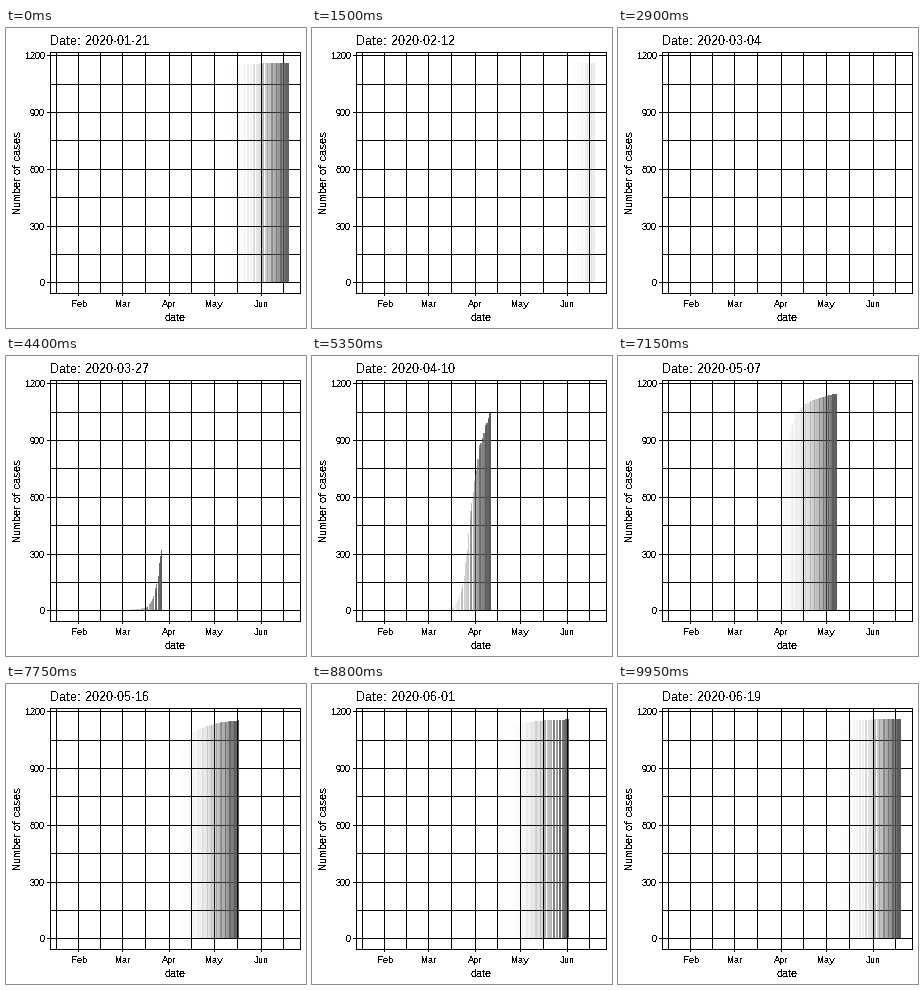
A matplotlib script for the animation above (10000 ms loop, 300 by 300 pixels).

```python
import numpy as np
import matplotlib.pyplot as plt
from matplotlib.animation import FuncAnimation
from matplotlib.collections import PolyCollection
from matplotlib.patches import Rectangle

plt.rcParams.update({
    "font.family": "Liberation Sans",
    "text.antialiased": False,
    "text.hinting": "default",
    "text.hinting_factor": 1,
})

FRAMES, DAYS, WAKE = 200, 150, 60
PANEL_X, PANEL_END = 44.21, 294.5
LEFT, RIGHT, TOP, BOTTOM = 44, 294, 24, 265
BAR_HALF = 0.45
PAD = 0.05 * (DAYS + 2 * BAR_HALF) + BAR_HALF
PX_PER_DAY = (PANEL_END - PANEL_X) / (DAYS + 2 * PAD)
PX_PER_CASE, ZERO_Y = 0.18917, 254.8
START = np.datetime64("2020-01-21")

fig = plt.figure(figsize=(3, 3), dpi=100, facecolor="white")
ax = fig.add_axes([0, 0, 1, 1])
ax.set(xlim=(0, 300), ylim=(300, 0))
ax.axis("off")


def x_of(day):
    return PANEL_X + PX_PER_DAY * (day + PAD)


def y_of(cases):
    return ZERO_Y - PX_PER_CASE * cases


def block(x, y, w, h, z=1):
    ax.add_patch(Rectangle((x, y), w, h, fc="black", lw=0, antialiased=False, zorder=z))


def label(x, y, text, px, **kw):
    return ax.text(x, y, text, size=px * 0.72, color="black", va="baseline", **kw)


# Grid: minor lines lie midway, with the first month's length used at both ends
months = {"Feb": 11, "Mar": 40, "Apr": 71, "May": 101, "Jun": 132}
major = np.array(list(months.values()))
step = major[1] - major[0]
padded = np.array([major[0] - step, *major, major[-1] + step])
minor = (padded[1:] + padded[:-1]) / 2
for day in [*major, *minor]:
    block(int(x_of(day)), TOP, 1, BOTTOM - TOP)
for cases in range(0, 1201, 150):
    block(LEFT, int(y_of(cases)), RIGHT - LEFT, 1)

# Ticks, border and labels
for name, day in months.items():
    block(int(x_of(day)), BOTTOM, 1, 3)
    label(x_of(day), 279, name, 9, ha="center")
for cases in range(0, 1201, 300):
    y = int(y_of(cases))
    block(LEFT - 3, y, 3, 1)
    label(39, y + 4, str(cases), 9, ha="right")

for y in (TOP, BOTTOM):
    block(LEFT, y, RIGHT - LEFT + 1, 1, z=3)
for x in (LEFT, RIGHT):
    block(x, TOP, 1, BOTTOM - TOP + 1, z=3)

label((PANEL_X + PANEL_END) / 2, 293, "date", 11, ha="center")
label(15, 145, "Number of cases", 11, ha="center", rotation=90,
      rotation_mode="anchor")
title = label(44, 17, "", 13)

# Cumulative cases by day
knots = [(40, 0), (45, 3), (46, 5), (52, 9), (56, 14), (59, 40), (62, 95),
         (64, 180), (66, 320), (69, 565), (71, 685), (74, 860), (77, 938),
         (81, 1042), (86, 1085), (92, 1110), (98, 1126), (106, 1142),
         (117, 1152), (132, 1157), (149, 1158), (150, 1161)]
days = np.arange(DAYS + 1)
totals = np.rint(np.interp(days, *zip(*knots)))

# Each day lands on its nearest frame; spare frames fall halfway between days
day_frames = np.rint(days * (FRAMES - 1) / DAYS)
bar_day = np.interp(np.arange(FRAMES), day_frames, days)
bar_cases = np.interp(np.arange(FRAMES), day_frames, totals)


def bar(day, cases):
    x0, x1 = np.floor([x_of(day - BAR_HALF), x_of(day + BAR_HALF)])
    y0, y1 = np.floor([ZERO_Y, y_of(cases)])
    return [(x0, y0), (x1, y0), (x1, y1), (x0, y1)]


shown = np.flatnonzero(np.floor(y_of(bar_cases)) < np.floor(ZERO_Y))
bars = PolyCollection([bar(bar_day[k], bar_cases[k]) for k in shown],
                      linewidths=0, antialiaseds=False, zorder=2)
ax.add_collection(bars)


def draw(i):
    title.set_text(f"Date: {START + i * DAYS // (FRAMES - 1)}")
    age = (i - shown) % FRAMES
    colors = np.full((len(shown), 4), 0x59 / 255)
    colors[:, 3] = np.clip(1 - age / WAKE, 0, 1) ** 3
    bars.set_facecolor(colors)
    return title, bars


anim = FuncAnimation(fig, draw, frames=FRAMES, interval=50, repeat=True,
                     repeat_delay=0, blit=False)
plt.show()
```
